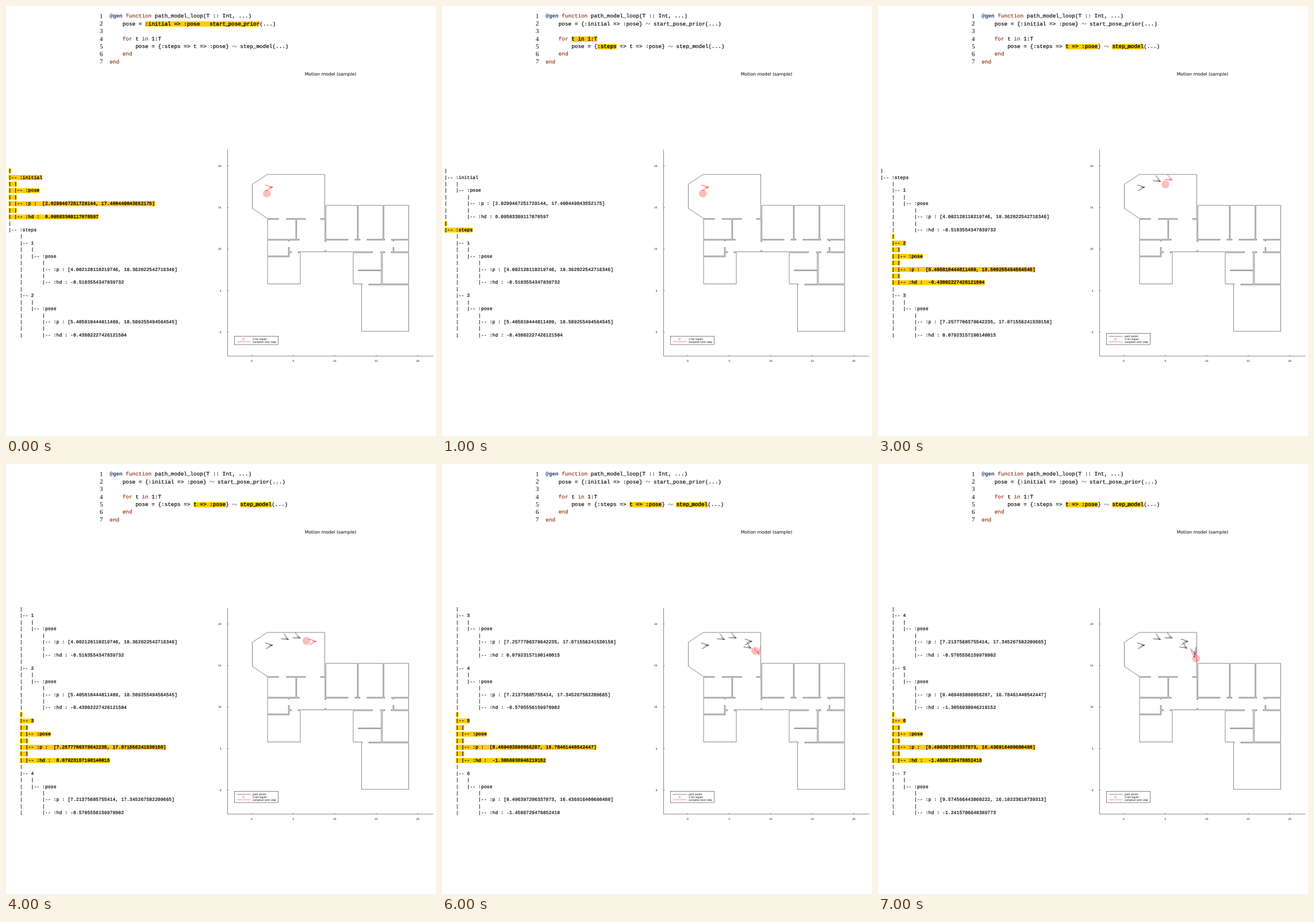
An HTML page for the animation above (8 s loop, 748 by 748 pixels).

```html
<!DOCTYPE html>
<html lang="en">
<head>
<meta charset="utf-8">
<title>Motion model</title>
<style>
  html, body { margin: 0; width: 100%; height: 100%; overflow: hidden; background: #fff; }
  svg { display: block; width: 748px; height: 748px; }
  text { white-space: pre; text-rendering: geometricPrecision; }
  .code { font: 9.35px "Liberation Mono", monospace; }
  .tree { font: 8.167px "Liberation Mono", monospace; }
  .code, .tree { stroke: #000; stroke-width: .18; }
  .on { stroke-width: .35; }
  .num { font: 11px "Liberation Serif", serif; text-anchor: end; }
  .small { font: 4.42px "DejaVu Sans", sans-serif; }
  .title { font: 7.74px "DejaVu Sans", sans-serif; text-anchor: middle; }
  .mid { text-anchor: middle; }
  .end { text-anchor: end; }
  .key { fill: #932d12; stroke: #932d12; }
  .macro { fill: #1f3a70; stroke: none; font-weight: bold; }
  .hl { fill: #fc0; }
  .line { fill: none; stroke: #000; stroke-width: .48; }
  .pen { stroke-width: .65; }
  .red { stroke: #f00; }
  .region { fill: #f00; fill-opacity: .26; }
  .scene { visibility: hidden; animation: show 8s step-end infinite; }
  @keyframes show { 0% { visibility: visible; } 12.5%, 100% { visibility: hidden; } }
</style>
</head>
<body>
<svg id="stage" viewBox="0 0 748 748"></svg>
<script>
const poses = [
  ['2.0299467251729144', '17.400449043552175', '0.09503309117078597'],
  ['4.002128110219746', '18.362022542716346', '-0.5183554347839732'],
  ['5.405810444811489', '18.509255494564545', '-0.43802227426121504'],
  ['7.2577706378642235', '17.871556241530158', '0.07923157190140015'],
  ['7.21375685755414', '17.345267582209665', '-0.5705556159978902'],
  ['8.469483896056287', '16.78461440542447', '-1.3056930946219152'],
  ['8.496397296337873', '16.436916400680488', '-1.4586729478852418'],
  ['9.574566443860222', '16.10223610739313', '-1.2415706648389773']
];
// distance commanded for each step
const moves = [0, 1.21, 1.186, 1.31, 0.06, 1.09, 0.98];

const text = (x, y, s, cls) => `<text x="${x}" y="${y}" class="${cls}">${s}</text>`;
const path = (d, cls = '') => `<path d="${d}" class="line ${cls}"/>`;
const rect = (x, y, w, h, cls) => `<rect x="${x}" y="${y}" width="${w}" height="${h}" class="${cls}"/>`;
const dot = (x, y, r) => `<circle cx="${x}" cy="${y}" r="${r}" class="region"/>`;

// ---- program listing ----
const CH = 5.61, SQUEEZE = 1.3;
const key = s => [s, 'key'], mark = s => [s, 'hl'];

function codeLine(n, indent, ...parts) {
  const y = 20.4 + 13.2 * (n - 1);
  let x = 180.3 + indent * CH, out = '';
  for (const part of parts) {
    const [s, cls = ''] = [].concat(part);
    let w = s.length * CH;
    if (s === '~') {
      w = 8.3;
      out += path(`M${x + .5} ${y - 1.8}c.4 -2.4 2.2 -2.4 3.6 -1.1s3.2 1.4 3.6 -1`, 'pen');
    } else if (cls === 'hl') {
      w -= SQUEEZE * (s.split('_').length - 1);
      out += rect(x, y - 7, w, 9.2, 'hl') +
        text(x, y, s.replace(/_(.)/g, `_<tspan dx="${-SQUEEZE}">$1</tspan>`), 'code on');
    } else {
      out += text(x, y, s, 'code ' + cls);
    }
    x += w;
  }
  return out;
}

function listing(i) {
  const prior = i ? ['pose = {:initial => :pose} ', '~', ' start_pose_prior(...)']
    : ['pose = ', mark(':initial => :pose   start_pose_prior'), '(...)'];
  const loop = i === 1 ? [mark('t in 1:T')] : ['t ', key('in'), ' 1:T'];
  const step = i === 0 ? ['pose = {:steps => t => :pose} ', '~', ' step_model(...)']
    : i === 1 ? ['pose = {', mark(':steps'), ' => t => :pose} ', '~', ' step_model(...)']
    : ['pose = {:steps => ', mark('t => :pose'), '} ', '~', ' ', mark('step_model'), '(...)'];
  return codeLine(2, 4, ...prior) + codeLine(4, 4, key('for'), ' ', ...loop) + codeLine(5, 8, ...step);
}

// ---- trace tree ----
const TW = 4.9, ROW = 11.43;

// eight rows for one pose, tight spacing when highlighted
function block(col, name, [px, py, hd], hl) {
  const a = hl ? '| ' : '|   ', b = hl ? '| ' : '|       ', gap = hl ? '  ' : ' ';
  return ['|', '|-- ' + name, a + '|', a + '|-- :pose', b + '|',
    `${b}|-- :p :${gap}[${px}, ${py}]`, b + '|', `${b}|-- :hd :${gap}${hd}`]
    .map(s => ({ col, s, hl }));
}

function treeRows(i) {
  const head = ['|', '|-- :steps'].map(s => ({ col: 0, s, hl: i === 1 }));
  const steps = (from, to) => {
    const rows = [];
    for (let n = from; n <= to; n++) rows.push(...block(4, n, poses[n], n === i - 1));
    return rows;
  };
  if (i < 3) return [...block(0, ':initial', poses[0], i === 0), ...head, ...steps(1, 2)];
  if (i === 3) return [...head, ...steps(1, 3)];
  return steps(i - 3, i);
}

function tree(i) {
  const top = i < 4 ? 289.1 : 255;
  return treeRows(i).map(({ col, s, hl }, r) => {
    const x = 4.35 + col * TW, y = top + r * ROW;
    return (hl ? rect(x, y - 6.5, s.length * TW, 8.5, 'hl') : '') + text(x, y, s, hl ? 'tree on' : 'tree');
  }).join('');
}

// ---- plot ----
const UNIT = 14.45;
const X = v => 427.3 + v * UNIT, Y = v => 567.3 - v * UNIT;

function arrow(pose, cls = '') {
  const [x, y, hd] = pose.map(Number);
  const at = turn => `${X(x + .5 * Math.cos(hd + turn))} ${Y(y + .5 * Math.sin(hd + turn))}`;
  const back = .75 * Math.PI;
  return path(`M${at(back)}L${at(0)}L${at(-back)}M${X(x)} ${Y(y)}L${at(0)}`, 'pen ' + cls);
}

function region(n) {
  if (!n) return dot(453.7, 326.1, 6.8);
  const [x, y, hd] = poses[n - 1].map(Number);
  return dot(X(x + moves[n] * Math.cos(hd)), Y(y + moves[n] * Math.sin(hd)), 6.8);
}

function legend(past) {
  const top = past ? 569.7 : 574.4;
  const label = (y, s) => text(429, y + 1.6, s, 'small');
  return rect(397.5, top, 76.2, 589 - top, 'line') +
    (past ? path('M401.5 574.7H425.5') + label(574.7, 'past poses') : '') +
    dot(413.3, 579.4, 2.1) + label(579.4, '2.0σ region') +
    path('M401.5 584.1H425.5', 'red') + label(584.1, 'sampled next step');
}

function scene(i) {
  const n = Math.max(0, i - 1);
  return `<g class="scene" style="animation-delay:${i - 8}s">` + listing(i) + tree(i) +
    poses.slice(0, n).map(p => arrow(p)).join('') + region(n) + arrow(poses[n], 'red') +
    legend(n > 0) + '</g>';
}

const walls = `M474 369.7V371.2H455V405.8H504V371.2H487.8V369.7H520.8V371.2H505.6V405.8H510V407.3
  H492.8V409H491.2V407.3H455V434.8H491.2V420H492.8V427.6H496.5V429.2H492.8V436.3H455V483.5H512V429.2
  H508V427.6H554.8V425H556.4V427.6H637.5V429.2H604V483.5H619.5V485.2H618.5V566H700.5V485.2H631V483.8
  H652.8V460.5H613V459.1H652.8V429.2H651.5V427.6H659V429.2H654.8V483.5H700.5V429.2H670V427.6H673.2V420
  H674.8V427.6H700.5V407.2H674.8V409H673.2V407.2H670.5V405.8H700.5V346.8H657.3V405.8H659V407.2H628V405.8
  H655.8V346.8H612.8V405.8H616V407.2H607V405.8H611.2V346.8H556.4V405.8H595V407.2H556.4V410H554.8V371.2
  H547.5V369.7H554.5V293H454.5L428.5 310V352L455 369.7Z`;

function backdrop() {
  let out = codeLine(1, 0, ['@gen', 'macro'], ' ', key('function'), ' path_model_loop(T :: Int, ...)') +
    codeLine(6, 4, key('end')) + codeLine(7, 0, key('end'));
  for (let n = 1; n <= 7; n++) out += text(168.5, 20.9 + 13.2 * (n - 1), n, 'num');
  out += text(564.5, 121.3, 'Motion model (sample)', 'title') + path(walls) + path('M385.5 250V609H743.5');
  for (let v = 0; v <= 20; v += 5) {
    out += path(`M385.5 ${Y(v)}h2M${X(v)} 609v-2`) +
      text(374.6, Y(v) + 1.6, v, 'small end') + text(X(v), 619.3, v, 'small mid');
  }
  return out;
}

document.getElementById('stage').innerHTML = backdrop() + poses.map((_, i) => scene(i)).join('');
</script>
</body>
</html>
```
